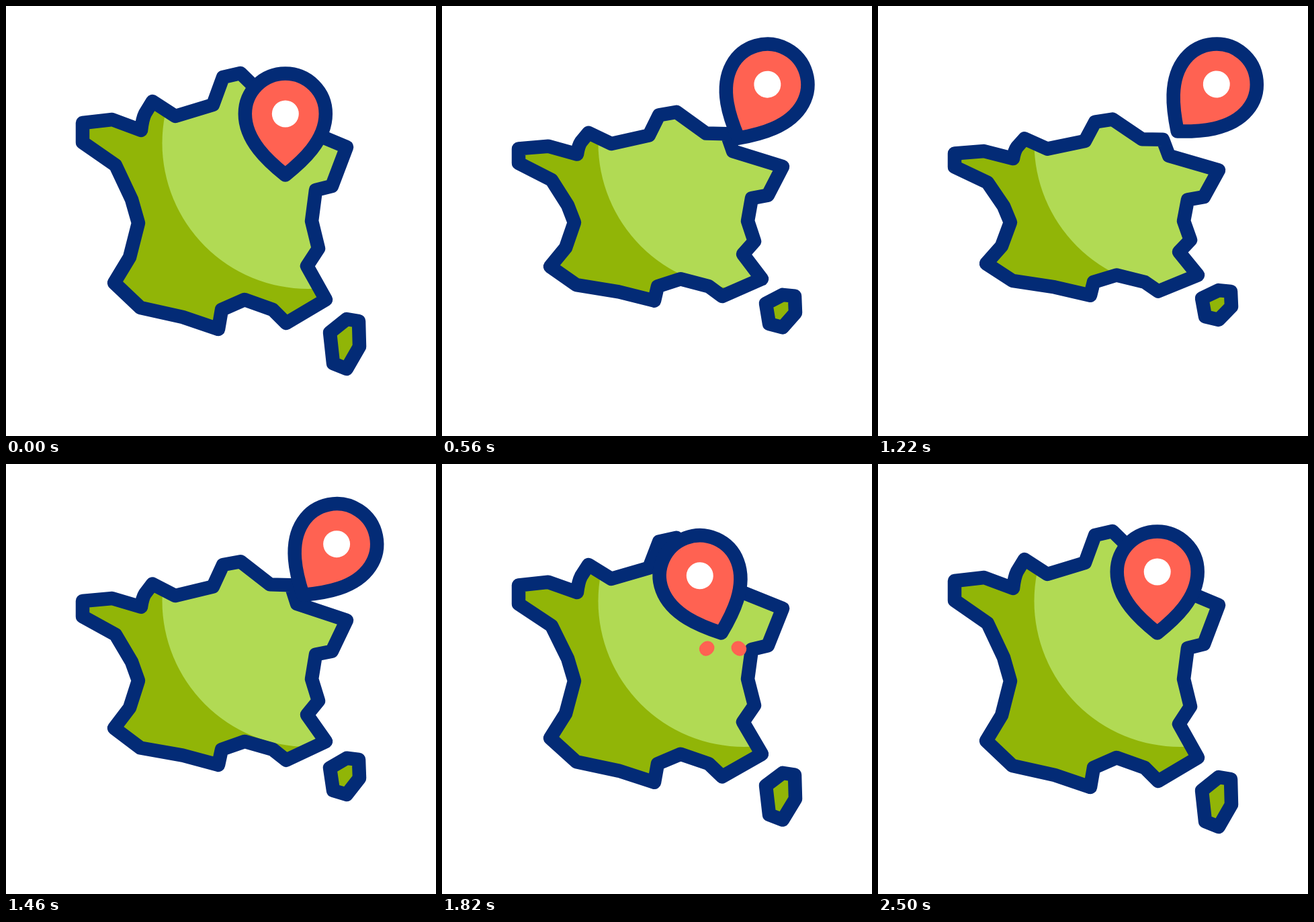
These frames come from a looping animation (640x640 px, 2.82 s). An HTML page with a canvas:

```html
<!DOCTYPE html>
<html>
<head>
<meta charset="utf-8">
<style>
  html, body { margin: 0; height: 100%; overflow: hidden; background: #fff; }
  canvas { display: block; width: 100vw; height: 100vh; }
</style>
</head>
<body>
<canvas id="stage" width="640" height="640"></canvas>
<script>
const ctx = document.getElementById('stage').getContext('2d');
const LOOP = 2820, PEAK = 1200, SWING = 1820, END = 2500;
const NAVY = '#032b76', DARK = '#91b507', LIGHT = '#b1da54', RED = '#ff6252';

// Corner points of the two land outlines
const country = new Path2D(`M114 174 158 169 201 185Q203 168 207 160L218 142 252 164 308 147
  323 106 349 100 393 143 424 144 433 179 507 210 485 268 461 274 455 320 465 361 448 387
  476 437 417 472 397 452 355 437 321 452 316 481 263 463 200 449 161 412 184 374 197 323
  187 288 163 237 114 203Z`);
const island = new Path2D('M507 466 525 469 526 507 507 540 487 532 482 486Z');
const pin = new Path2D('M0 0C-25 -20 -60 -51 -60 -91A60 60 0 0 1 60 -91C60 -51 25 -20 0 0Z');

const mix = (a, b, k) => a + (b - a) * k;
const span = (t, from, to) => Math.max(0, Math.min(1, (t - from) / (to - from)));

// Ease through the cubic curve with handles (a,0) and (b,1), solved by bisection
function ease(x, a, b) {
  let lo = 0, hi = 1;
  for (let i = 0; i < 24; i++) {
    const s = (lo + hi) / 2, r = 1 - s;
    if (3 * a * s * r * r + 3 * b * s * s * r + s ** 3 < x) lo = s; else hi = s;
  }
  return lo * lo * (3 - 2 * lo);
}

const rise = t => ease(span(t, 0, PEAK), 0.33, 0);
const squash = t => 0.312 * (rise(t) - ease(span(t, PEAK, END - 20), 0.33, 0));
const lift = t => rise(t) - span(t, PEAK, 1790) ** 2.5;

// Lean out, tip over on landing, then a damped swing
function tilt(t) {
  const lean = 39.7, tipped = -20.6;
  if (t < PEAK) return lean * (1 - (1 - t / PEAK) ** 2);
  if (t < SWING) return mix(lean, tipped, ease(span(t, PEAK, SWING), 0.97, 0.46));
  const k = span(t, SWING, END);
  return tipped * (1 - k) ** 1.8 * Math.cos(2 * Math.PI * k);
}

// Scales the points about y, so that the outline keeps its weight
function scaled(path, y, scale) {
  const result = new Path2D();
  result.addPath(path, new DOMMatrix([1, 0, 0, scale, 0, y * (1 - scale)]));
  return result;
}

function fill(path, color) {
  ctx.fillStyle = color;
  ctx.fill(path);
}

function stroke(path, color) {
  ctx.strokeStyle = color;
  ctx.stroke(path);
}

function disc(x, y, r, color) {
  const path = new Path2D();
  path.arc(x, y, r, 0, 2 * Math.PI);
  fill(path, color);
}

function drawMap(t) {
  const p = squash(t);
  const land = scaled(country, 320, 1 - p), isle = scaled(island, 361, 1 - 1.31 * p);
  fill(land, DARK);
  fill(isle, DARK);
  ctx.save();
  ctx.clip(land);
  disc(449.5, 204, 217, LIGHT);
  ctx.restore();
  stroke(land, NAVY);
  stroke(isle, NAVY);
}

function drawSplash(t) {
  const head = span(t, 1760, 1800), tail = span(t, 1770, 1827);
  if (head === 0 || tail === 1) return;
  for (const side of [-1, 1]) {
    const point = k => [418 + side * mix(4, 25, k), mix(258, 275.5, k)];
    const drop = new Path2D();
    drop.moveTo(...point(tail));
    drop.lineTo(...point(head));
    stroke(drop, RED);
  }
}

function drawPin(t) {
  const up = lift(t);
  ctx.save();
  ctx.translate(415.7 + 30 * up, 251.5 - 65 * up);
  ctx.rotate(tilt(t) * Math.PI / 180);
  fill(pin, RED);
  stroke(pin, NAVY);
  disc(0, -91, 20, '#fff');
  ctx.restore();
}

function frame() {
  const t = performance.now() % LOOP;
  ctx.clearRect(0, 0, 640, 640);
  ctx.lineJoin = ctx.lineCap = 'round';
  ctx.lineWidth = 20.5;
  drawMap(t);
  drawSplash(t);
  drawPin(t);
  requestAnimationFrame(frame);
}
frame();
</script>
</body>
</html>
```
